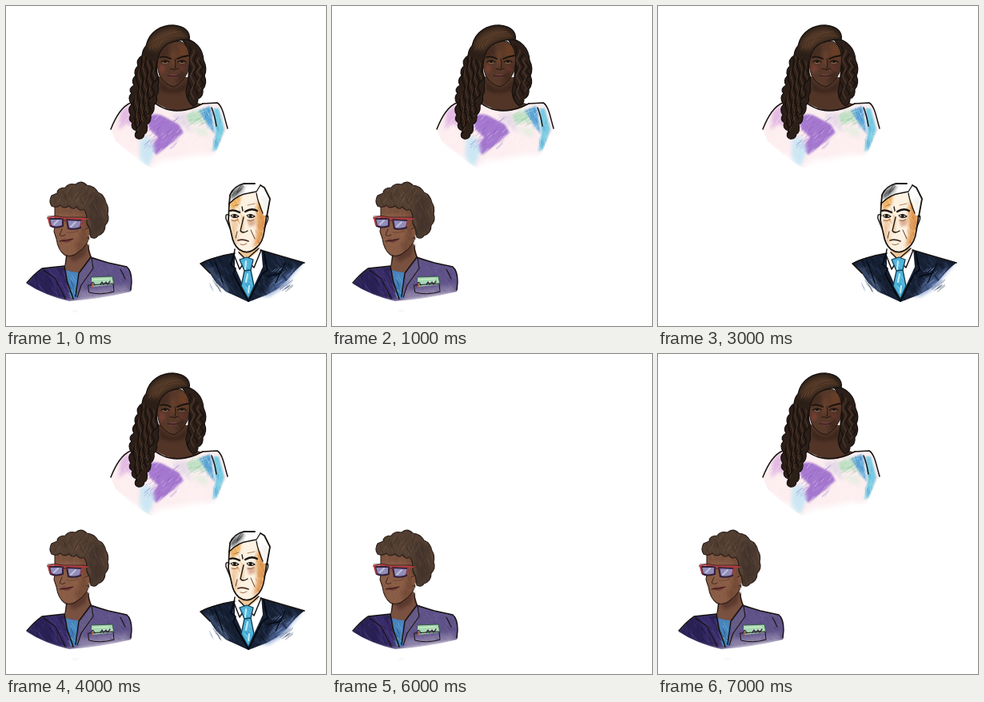
Recreate the animation shown at these times as an HTML page with a canvas. Size 400x400 px, loop 8 s.

```html
<!DOCTYPE html>
<html lang="en">
<head>
<meta charset="utf-8">
<title>Three portraits</title>
<style>
html, body { margin: 0; width: 100%; height: 100%; overflow: hidden; background: #fff; }
canvas { display: block; width: 100vw; height: 100vh; }
</style>
</head>
<body>
<canvas id="stage"></canvas>
<script>
const SIZE = 400, STEP = 1000;
const INK = '#17120f';
// Who is visible during each second: T top, L left, M right.
const SCHEDULE = ['TLM', 'TL', 'T', 'TM', 'TLM', 'LM', 'L', 'TL'];
const ratio = window.devicePixelRatio || 1;
let seed = 7;
let g;

function random() {
  seed = (seed * 16807) % 2147483647;
  return seed / 2147483647;
}
const between = (a, b) => a + (b - a) * random();

function sheet(canvas) {
  canvas.width = canvas.height = SIZE * ratio;
  const context = canvas.getContext('2d');
  context.scale(ratio, ratio);
  context.lineCap = context.lineJoin = 'round';
  return context;
}

function fill(d, color, blur = 0, alpha = 1) {
  g.save();
  g.globalAlpha = alpha;
  if (blur) g.filter = `blur(${blur * ratio}px)`;
  g.fillStyle = color;
  g.fill(new Path2D(d));
  g.restore();
}

function line(d, width = 1, color = INK) {
  g.strokeStyle = color;
  g.lineWidth = width;
  g.stroke(new Path2D(d));
}

function inside(d, draw) {
  g.save();
  g.clip(new Path2D(d));
  draw();
  g.restore();
}

// Pencil texture: short slanted strokes scattered over a box.
function hatch([x, y, w, h], colors, count, dx, dy, alpha = 0.25, width = 1) {
  g.save();
  g.globalAlpha = alpha;
  g.lineWidth = width;
  for (let i = 0; i < count; i++) {
    const px = x + w * random(), py = y + h * random(), k = between(0.5, 1.2);
    g.strokeStyle = colors[i % colors.length];
    g.beginPath();
    g.moveTo(px, py);
    g.lineTo(px + dx * k, py + dy * k);
    g.stroke();
  }
  g.restore();
}

// A lock of hair that waves around a line from top to bottom.
function curl(x0, y0, x1, y1, amp, phase, color, width) {
  g.beginPath();
  for (let i = 0; i <= 40; i++) {
    const u = i / 40;
    const x = x0 + (x1 - x0) * u + amp * Math.sin(u * 19 + phase);
    g.lineTo(x, y0 + (y1 - y0) * u);
  }
  g.strokeStyle = color;
  g.lineWidth = width;
  g.stroke();
}

function drawTop() {
  const shirt = 'M156 121C146 126 138 138 131 154L137 169Q150 181 165 192L180 202Q220 196 262 186Q266 171 277 153C274 139 272 124 264 121L244 122Q216 140 184 117Z';
  inside(shirt, () => {
    fill('M125 110H282V205H125Z', '#fdeef0');
    fill('M143 132L155 123L160 150L150 147L141 155Z', '#dcaee0', 2, .8);
    fill('M177 139Q187 132 197 138L216 148L222 158L206 172L188 186L180 178L190 164L179 154Z', '#9c6bcb', 1.2, .9);
    fill('M168 166L180 163L186 180L178 202H166Z', '#cbe7f3', 2);
    fill('M206 137L224 133L231 158L219 149Z', '#d6cbe2', 2, .6);
    fill('M225 136L243 129L247 147L238 144L229 147Z', '#b3dcbb', 1.5, .85);
    fill('M229 152L250 152L254 165L241 161Z', '#e0eddb', 2, .7);
    fill('M241 131L255 125L259 150L261 160L253 150Z', '#4b9dd4', 1.2, .9);
    fill('M259 128L266 128L273 154L264 180L258 182L262 158Z', '#6cc6e0', 1.3, .9);
    hatch([178, 138, 40, 38], ['#8350b9', '#bd9ae0'], 75, -7, 6, .3);
    hatch([226, 131, 20, 20], ['#8fc99e', '#e4f2e4'], 35, 7, -3, .4);
    hatch([244, 127, 13, 24], ['#2b78c0', '#9bd6ea'], 22, 3, 8, .35);
    hatch([259, 135, 10, 38], ['#2f8fc8', '#a5e2ec'], 22, 1, 9, .35);
    hatch([137, 128, 125, 60], ['#fff', '#fae0e8'], 80, -5, 6, .4);
  });
  // The lower edge melts into the paper.
  fill('M120 160Q145 181 166 190L177 205L192 193L219 190L240 185L259 187L286 154V220H120Z', '#fff', 4);

  fill('M186 88L228 89L226 108Q232 119 245 123Q214 142 181 117Q187 109 187 100Z', '#523527');
  fill('M191 91Q208 116 227 91L226 104Q210 113 193 105Z', '#2f1e18', 2, .65);
  line('M181 117Q207 142 246 122', 1.6);

  const back = 'M219 40C237 42 246 53 247 68Q252 78 248 87Q252 97 246 104Q247 113 240 116Q240 123 234 125Q226 119 225 107Q229 90 229 66Q228 52 219 40Z';
  fill(back, '#2c1f19');
  inside(back, () => {
    for (let i = 0; i < 5; i++) curl(229 + i * 4, 50 + i * 5, 229 + i * 4, 121 - i * 5, 2, i, i % 2 ? '#4a3427' : '#1a120e', 1.6);
  });
  line(back, 1.3);

  const face = 'M189 61C191 47 207 41 220 45C231 52 231 69 227 83Q221 96 210 101Q199 99 192 87Q188 76 189 61Z';
  fill(face, '#573829');
  inside(face, () => {
    fill('M217 46L230 51L226 66L214 66Z', '#6d4026', 2, .8);
    fill('M220 74L228 72L222 92L212 99Z', '#38241c', 2, .7);
    fill('M188 50L204 47L204 62L190 66Z', '#3f281e', 2, .7);
    fill('M190 74L198 74L199 81L193 84Z', '#94473f', 2, .6);
    fill('M219 75L226 74L223 82L217 81Z', '#863f39', 2, .6);
    fill('M207 56L212 56L211 74L206 75Z', '#74492f', 2, .7);
    hatch([190, 47, 38, 50], ['#332018', '#76503a'], 75, 2, 3, .24, .8);
  });
  line(face, .9);
  line('M193 64Q199 62 206 66M214 66Q220 63 228 62', 1.8);
  for (const x of [199, 220]) {
    line(`M${x - 5} 70Q${x} 66 ${x + 5} 70`, 1.2);
    line(`M${x - 3} 71Q${x} 72 ${x + 3} 71`, .7, '#a58a76');
    fill(`M${x - 1.5} 68h3v3h-3Z`, INK);
  }
  line('M211 66Q213 74 211 78M205 79Q208 77 210 80L215 78', 1, '#211410');
  fill('M202 87Q206 84 209 86Q212 84 216 87Q209 92 202 87Z', '#704040');
  line('M202 87Q209 89 216 87', 1, '#231011');

  const hair = 'M229 42Q214 42 203 47Q193 52 191 63Q187 74 189 84Q192 92 190 100Q192 107 188 112Q190 120 185 124Q186 132 181 136Q182 145 176 148Q178 158 173 160Q172 167 165 166Q159 164 163 156Q155 153 158 146Q152 142 156 136Q151 129 157 123Q151 115 157 109Q152 104 160 99Q156 93 162 87Q159 80 165 75Q162 67 170 62Q171 54 175 50C179 31 195 24 209 24C224 25 231 33 229 42Z';
  fill(hair, '#2c1f18');
  inside(hair, () => {
    fill('M176 52C182 34 197 28 212 28L228 39Q200 40 190 56Z', '#5a3f2b', 3, .9);
    for (let i = 0; i < 11; i++) {
      curl(168 + i * 2.3, 62 + i, 157 + i * 2, 165 - i * 3, 2.6, i * .9, i % 2 ? '#4d3628' : '#18110e', i % 2 ? 1.1 : 1.8);
    }
    for (let i = 0; i < 8; i++) line(`M${177 + i * 2} ${56 - i}Q${183 + i * 2} ${36 - i / 2} ${226 - i} ${39 - i}`, .7, i % 2 ? '#6b4a33' : '#35241a');
  });
  line(hair, 1.3);
  line('M156 121C146 125 138 136 131 154M246 122L264 121C271 125 273 140 277 153M257 127Q261 137 263 150', 1.5);
}

function drawLeft() {
  const jacket = 'M72 325L45 328Q35 335 26 347Q47 361 79 369Q119 366 156 357L157 340Q156 329 151 326L127 321L106 313L91 333Z';
  inside(jacket, () => {
    fill('M20 310H160V375H20Z', '#5f5288');
    fill('M24 347L41 328L74 325L77 368L39 363Z', '#292154', 2);
    fill('M50 327L67 330L82 365L61 359Z', '#3f3272', 2, .75);
    fill('M91 333L108 315L107 335L93 360Z', '#665a86', 1);
    fill('M90 356L154 349L153 365L88 371Z', '#a095b4', 3, .7);
    hatch([28, 325, 50, 39], ['#151338', '#5c4b98'], 90, 4, 7, .35);
    hatch([91, 318, 62, 46], ['#3f2f68', '#9188ad', '#5a6aa8'], 180, 3, 3, .35, .8);
  });
  fill('M20 349Q50 365 79 370L93 368L158 358V384H20Z', '#fff', 2);
  fill('M83 381h7v1h-7Z', '#bbb7bd', 1, .35);

  fill('M75 301L102 297L107 314L92 334L74 330Z', '#7a5140');
  fill('M77 311L103 296L99 312L84 320Z', '#4a2c22', 2, .65);
  fill('M75 330Q82 333 91 333L89 365L81 365Z', '#4784bd');
  hatch([78, 335, 9, 25], ['#235788', '#80bbdc'], 24, 3, 6, .5);

  const face = 'M61 247Q81 241 103 253L105 286Q102 300 90 308Q81 315 73 311Q65 305 63 291L60 282L61 275Z';
  fill(face, '#8a5d46');
  inside(face, () => {
    fill('M94 253L106 254L105 295L91 310L86 302Q97 287 94 253Z', '#6d4632', 3, .75);
    fill('M61 246H98L101 260H60Z', '#6b4936', 2, .5);
    hatch([61, 251, 41, 56], ['#a27256', '#5f3e2e'], 75, 2, 4, .25);
  });
  line(face, 1.1, '#2e1d17');
  fill('M99 277Q106 274 108 281Q106 288 101 290Z', '#80553f');
  line('M99 279Q106 274 108 281Q106 288 101 290', 1, '#33211a');
  line('M104 287Q106 292 103 293', 1.3, '#d6ccc9');
  line('M70 279L67 286Q70 289 74 286', 1, '#3d241b');
  line('M76 283Q85 284 90 281', .7, '#5f3e2f');
  fill('M68 293Q72 290 75 292Q79 290 83 292Q76 299 68 293Z', '#733c38');
  line('M67 294Q75 294 84 291', 1, '#2b1615');
  line('M76 312L73 329M103 299Q103 309 107 315', 1.2);

  const hair = 'M57 250Q53 244 57 237L64 234Q64 227 74 227Q78 221 87 223Q94 217 101 224Q111 225 115 233Q123 236 125 246Q129 252 127 260Q130 268 124 274Q124 284 115 287Q112 292 106 289L104 277Q100 273 101 266Q101 258 97 254Q92 257 88 251Q84 256 79 250Q72 254 68 249Q63 253 57 250Z';
  fill(hair, '#523f32');
  inside(hair, () => {
    fill('M103 232L118 240L124 278L109 288L104 260Z', '#3f312a', 3, .75);
    hatch([56, 222, 70, 60], ['#735a49', '#31251f', '#604b3d'], 175, 3, 9, .3);
    hatch([66, 224, 47, 18], ['#7e624f', '#3b2c24'], 40, -5, 9, .3);
  });
  line(hair, 1.2, '#2a1e19');

  for (const d of ['M54 266L71 266L71 275Q62 278 56 275Z', 'M76 267L95 268L93 277Q85 280 78 278Z']) {
    fill(d, '#938cb8');
    line(d, 2.1, '#33203a');
  }
  line('M60 273L65 268M81 276L87 270', 1.8, '#bfc2df');
  line('M52 265Q62 262 72 265L96 266L102 266M53 266L55 274M95 268L94 275', 1.9, '#b23b3c');
  line('M72 268L76 268', 1.6, '#6d2733');
  line('M52 263Q62 261 72 264L96 264L102 265', .7, '#2a1820');

  line('M26 346Q35 335 45 328L73 325L76 343L84 366M106 314L91 334L87 363M108 315L128 321L151 326Q157 331 157 345L156 355', 1.5);
  line('M107 315L109 328L94 349L89 364M47 330L62 341L74 366M143 329L149 341', 1.1);
  fill('M107 339L133 338L135 348L107 351Z', '#a6d8b2');
  line('M107 339L133 338L135 348', .9, '#325542');
  line('M103 349L134 347L135 357Q118 362 104 358Z', 1);
  line('M109 342L129 341M118 345L132 344', 1.2, '#d6edcb');
  line('M106 349Q108 342 111 349M118 348L120 345L122 348L125 345L127 348L130 344', 1.4, '#332c42');
  line('M108 351L109 347', 2, '#a66251');
}

function drawRight() {
  const suit = 'M243 322Q250 315 286 309L303 335L318 305Q345 313 373 321Q362 329 352 342L340 353L326 361L303 370L288 363L275 357L262 345L255 334Z';
  fill('M345 323L370 323L357 338L350 350L329 363L318 363Z', '#7f9bcd', 2, .7);
  fill(suit, '#162033');
  inside(suit, () => {
    fill('M336 343L366 325L352 354L318 369Z', '#5a73a9', 3, .8);
    fill('M248 326L258 324L283 358L266 355Z', '#4d6288', 3, .65);
    hatch([246, 313, 119, 52], ['#060d17', '#33476f', '#1f2c46'], 200, 5, 7, .45, 1.2);
    hatch([328, 330, 33, 31], ['#93acd6', '#2c4a82'], 45, 7, -6, .5);
  });
  hatch([254, 338, 22, 12], ['#263653', '#7c91b7'], 16, 5, 9, .5);
  hatch([328, 347, 24, 10], ['#263653', '#7c91b7'], 18, 8, -6, .5);
  fill('M286 304L319 303L321 326L303 365L286 326Z', '#fff');
  fill('M289 295L316 292L315 307L302 317L291 309Z', '#f0c796');

  const face = 'M279 246Q284 236 296 234L316 234Q326 247 326 261L323 281Q321 296 313 302Q302 312 291 304Q284 298 282 286L278 268Z';
  fill(face, '#fdf2e2');
  inside(face, () => {
    fill('M279 243L294 236L292 248L282 257Z', '#e9a44a', 1.6, .85);
    fill('M315 243L327 252L325 276L319 296L309 303L314 283L313 264Z', '#d98a3f', 2, .85);
    fill('M281 266L290 266L288 279L291 298L284 292Z', '#e8b079', 2, .65);
    fill('M301 267L312 266L311 274L304 276Z', '#d39a78', 1.5, .75);
    fill('M294 262L298 262L297 283L293 285Z', '#e8b67f', 1.3, .6);
    hatch([310, 245, 15, 52], ['#c4682c', '#f3c27c'], 40, 2, 6, .4);
    hatch([281, 240, 12, 55], ['#d98d43', '#fff0d8'], 30, 2, 6, .35);
  });
  line('M279 246L278 268L282 286Q284 298 291 304Q302 312 313 302Q321 296 323 281L326 261', 1.7);

  const hair = 'M279 247L280 236Q285 225 297 222L312 222L323 227L330 240L327 261L322 262L318 247L313 234Q294 231 279 247Z';
  fill(hair, '#fff');
  inside(hair, () => {
    fill('M279 240L285 229L299 223L294 232L284 241Z', '#3a3d40', 2, .8);
    fill('M319 238L329 240L326 260L321 256Z', '#ebe9e5', 2, .6);
    hatch([282, 225, 13, 13], ['#171a1e', '#a8aaab'], 25, 5, -7, .4);
  });
  line('M279 248L280 236Q285 225 297 222L311 222M318 224L323 227L330 241L326 263', 1.8);
  line('M279 247Q291 235 303 234L313 232L318 224M313 234Q315 246 321 259', 1.3);

  line('M279 262Q274 258 275 266L280 278M325 263Q329 260 327 268L323 278', 1.4);
  line('M280 256Q285 254 292 258M299 257Q307 252 314 256', 2.3);
  for (const x of [286, 306]) {
    line(`M${x - 5} 262Q${x} 259 ${x + 5} 263Q${x} 266 ${x - 4} 263`, 1.1);
    fill(`M${x - 2} 260h3.5v4h-3.5Z`, '#211c19');
    line(`M${x - 4} 268Q${x} 270 ${x + 4} 267`, .9, '#84593c');
  }
  line('M295 251L296 256M297 264L293 281Q296 285 302 281', 1.3);
  line('M289 282L287 290M306 280L311 291', 1, '#5b3a27');
  line('M290 293Q296 291 303 294', 1.8, '#4d2d25');
  line('M293 298Q297 300 301 297', 1, '#a56b48');
  line('M285 250L291 248M302 249L311 247', .8, '#9c693e');

  line('M286 304L285 311L292 329L300 317L310 327L319 305M300 317L291 308M300 317L316 303', 1.5);
  fill('M292 317L301 314L309 317L306 330L310 350L303 366L294 350L298 331Z', '#4fb3da');
  hatch([297, 319, 8, 32], ['#1a86b7', '#8fdbec'], 24, 3, 4, .45);
  line('M300 319L299 329M302 335L300 345M304 350L303 358', 2, '#c6edf5');
  line('M292 317L301 314L309 317L306 330L298 331ZM298 331L294 350L303 366L310 350L306 330', 1.3, '#123d50');
  line('M286 309Q262 313 243 322L255 334M318 305Q345 313 373 321', 1.6);
  line('M285 310L281 323L287 328L284 335L303 369L320 335L327 330L322 307', 1.6, '#03070d');
  line('M262 321L271 345M349 321L337 346M327 338L343 334', 1.3, '#050b14');
}

const portraits = {};
for (const [key, draw] of [['T', drawTop], ['L', drawLeft], ['M', drawRight]]) {
  portraits[key] = document.createElement('canvas');
  g = sheet(portraits[key]);
  draw();
}

const stage = sheet(document.getElementById('stage'));

function render() {
  const visible = SCHEDULE[Math.floor(performance.now() / STEP) % SCHEDULE.length];
  stage.filter = 'none';
  stage.fillStyle = '#fff';
  stage.fillRect(0, 0, SIZE, SIZE);
  // The full group is crisp; partial groups look slightly softer.
  if (visible.length < 3) stage.filter = `blur(${0.4 * ratio}px)`;
  for (const key of visible) stage.drawImage(portraits[key], 0, 0, SIZE, SIZE);
  requestAnimationFrame(render);
}
render();
</script>
</body>
</html>
```
